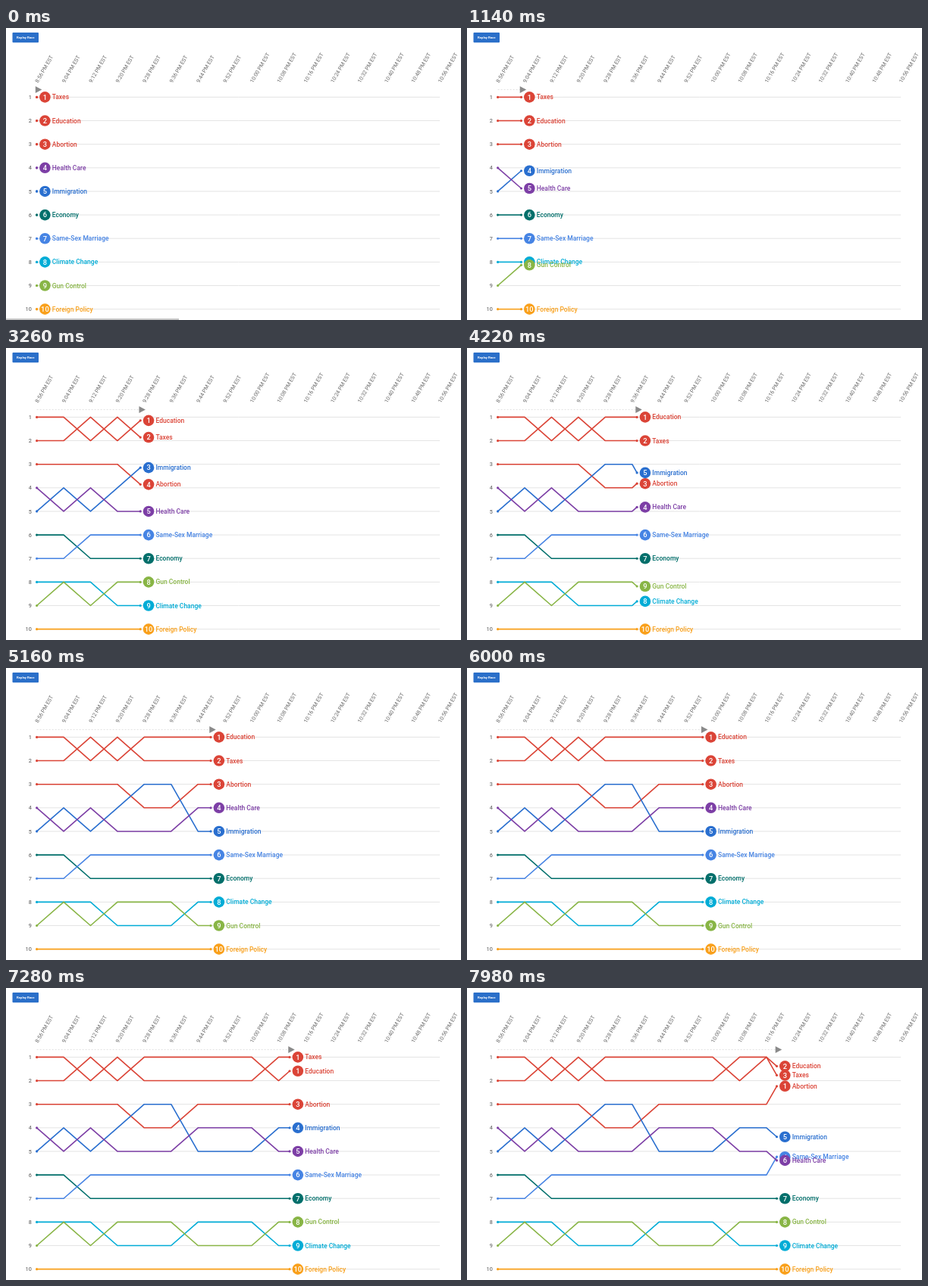
An HTML page with a canvas that plays this animation: 600 by 386 pixels, repeating every 8 s.

```html
<!DOCTYPE html>
<html lang="en">
<head>
<meta charset="utf-8">
<title>Issue race</title>
<style>
  html, body { margin: 0; width: 100%; height: 100%; overflow: hidden; background: #fff; }
  canvas { display: block; width: 600px; height: 386px; }
</style>
</head>
<body>
<canvas id="stage"></canvas>
<script>
const W = 600, H = 386, LOOP = 8000;
const LEFT = 40.6, COL = 35.43, TOP = 91.4, ROW = 31.14, COLS = 16, ROWS = 10;
const FONT = 'Roboto, Arial, sans-serif';

// One rank per eight-minute step; A stands for 10.
const issues = [
  ['Taxes', '#db4437', '112122222113'],
  ['Education', '#db4437', '221211111212'],
  ['Abortion', '#db4437', '333344333331'],
  ['Immigration', '#2a6fcf', '545433555445'],
  ['Economy', '#006f6b', '667777777777'],
  ['Same-Sex Marriage', '#4684e4', '776666666664'],
  ['Health Care', '#7d3fa6', '454555444556'],
  ['Climate Change', '#00acd6', '888999888999'],
  ['Gun Control', '#88b545', '989888999888'],
  ['Foreign Policy', '#f9a01b', 'AAAAAAAAAAAA']
].map(([name, color, ranks]) => ({ name, color, ranks: [...ranks].map(c => parseInt(c, 16)) }));

// Elapsed ms and the column reached by then.
const pace = [[820, 0.425], [2060, 2.157], [3260, 3.855], [5160, 6.475], [6000, 7.625], [7280, 9.41], [8000, 10.41]];
const RAMP_START = 200;

const canvas = document.getElementById('stage');
const ctx = canvas.getContext('2d');
const dpr = window.devicePixelRatio || 1;
canvas.width = W * dpr;
canvas.height = H * dpr;

const colX = i => LEFT + COL * i;
const rowY = rank => TOP + ROW * (rank - 1);

function progress(t) {
  const [t0, p0] = pace[0];
  if (t <= t0) return p0 * Math.max(0, (t - RAMP_START) / (t0 - RAMP_START)) ** 2;
  const k = pace.findIndex(([end]) => t <= end);
  const [a, pa] = pace[k - 1], [b, pb] = pace[k];
  return pa + (pb - pa) * (t - a) / (b - a);
}

function text(str, x, y, size, weight, color, align = 'left') {
  ctx.font = `${weight} ${size}px ${FONT}`;
  ctx.textAlign = align;
  ctx.fillStyle = color;
  ctx.fillText(str, x, y);
}

function disc(x, y, r, color) {
  ctx.fillStyle = color;
  ctx.beginPath();
  ctx.arc(x, y, r, 0, Math.PI * 2);
  ctx.fill();
}

function rule(x1, x2, y, color, dash = []) {
  ctx.strokeStyle = color;
  ctx.lineWidth = 1;
  ctx.setLineDash(dash);
  ctx.beginPath();
  ctx.moveTo(x1, y);
  ctx.lineTo(x2, y);
  ctx.stroke();
  ctx.setLineDash([]);
}

function drawButton() {
  ctx.fillStyle = '#2a6fc9';
  ctx.beginPath();
  ctx.roundRect(8.5, 6, 34.5, 13.3, 1);
  ctx.fill();
  text('Replay Race', 25.8, 14.2, 4.3, 700, '#fff', 'center');
}

function clock(i) {
  const min = 56 + 8 * i;
  return `${8 + Math.floor(min / 60)}:${String(min % 60).padStart(2, '0')} PM EST`;
}

function drawAxes() {
  for (let i = 0; i < COLS; i++) {
    ctx.save();
    ctx.translate(colX(i) + 1.7, 73);
    ctx.rotate(-Math.PI / 3);
    text(clock(i), 0, 0, 7.1, 400, '#666');
    ctx.restore();
  }
  for (let r = 1; r <= ROWS; r++) {
    rule(LEFT, colX(COLS - 1), rowY(r), '#e4e4e4');
    text(r, 33.8, rowY(r) + 2.6, 7.3, 500, '#757575', 'right');
  }
}

function drawPointer(x) {
  rule(LEFT, x, 81.5, '#e2e2e2', [2, 2]);
  ctx.fillStyle = '#8a8a8a';
  ctx.beginPath();
  ctx.moveTo(x - 1.8, 77);
  ctx.lineTo(x + 6.7, 81.5);
  ctx.lineTo(x - 1.8, 86);
  ctx.fill();
}

function drawLine({ color, ranks }, step, x, y) {
  ctx.strokeStyle = color;
  ctx.lineWidth = 1.6;
  ctx.lineJoin = 'round';
  ctx.beginPath();
  for (let i = 0; i <= step; i++) ctx.lineTo(colX(i), rowY(ranks[i]));
  ctx.lineTo(x, y);
  ctx.stroke();
  disc(LEFT, rowY(ranks[0]), 1.6, color);
  disc(x, y, 1.6, color);
}

function drawLabel({ name, color, ranks }, next, x, y) {
  disc(x + 10.8, y, 7.3, color);
  text(ranks[next], x + 10.8, y + 3.3, 9.3, 500, '#fff', 'center');
  text(name, x + 20.2, y + 3, 8.5, 500, color);
}

function draw(t) {
  ctx.setTransform(dpr, 0, 0, dpr, 0, 0);
  ctx.fillStyle = '#fff';
  ctx.fillRect(0, 0, W, H);

  const p = progress(t), step = Math.floor(p), next = Math.ceil(p), x = colX(p);
  const headY = ({ ranks }) => rowY(ranks[step] + (ranks[next] - ranks[step]) * (p - step));

  drawButton();
  drawAxes();
  drawPointer(x);
  for (const issue of issues) drawLine(issue, step, x, headY(issue));
  for (const issue of issues) drawLabel(issue, next, x, headY(issue));

  // Scrollbar fading out.
  ctx.globalAlpha = Math.min(1, Math.max(0, (450 - t) / 300));
  ctx.fillStyle = '#c6c6c6';
  ctx.fillRect(0, 384, 228, 2);
  ctx.globalAlpha = 1;
}

const start = performance.now();
function tick() {
  draw((performance.now() - start) % LOOP);
  requestAnimationFrame(tick);
}
tick();
</script>
</body>
</html>
```
